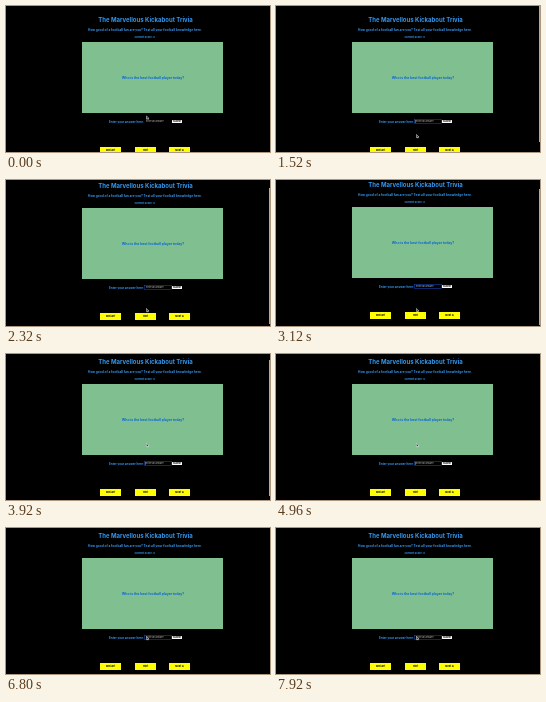
Animation, 264 px wide and 146 px high, one loop 8 s. Source, as an HTML page:

```html
<!DOCTYPE html>
<html lang="en">
<head>
<meta charset="utf-8">
<style>
  html, body { margin: 0; width: 100%; height: 100%; overflow: hidden; background: #000; }
  svg { display: block; width: 100vw; height: 100vh; }
  text { font-family: Inter, Arial, sans-serif; font-weight: 700; text-anchor: middle; fill: #3498f0; }
  .start { text-anchor: start; }
  .plain { font-weight: 400; }
</style>
</head>
<body>
<svg viewBox="0 0 264 146">
  <g id="page">
    <text x="139.5" y="16" font-size="6">The Marvellous Kickabout Trivia</text>
    <text x="139" y="24.9" font-size="3.2">How good of a football fan are you? Test all your football knowledge here.</text>
    <text x="138.7" y="32.1" font-size="2.55">Current Score: 0</text>
    <rect x="76" y="36" width="141" height="71" fill="#80bf8f"/>
    <text x="147" y="72.7" font-size="3.4" style="fill:#0c66d8">Who is the best football player today?</text>
    <text class="start" x="103" y="116.7" font-size="3">Enter your answer here:</text>
    <rect id="field" x="138.5" y="113.5" width="27" height="4" fill="#000" stroke="#1450d0" stroke-width=".5"/>
    <text class="start plain" x="140" y="116.4" font-size="2.3" style="fill:#ccc">Enter an answer</text>
    <rect id="caret" x="139.3" y="114" width=".4" height="2.8" fill="#fff"/>
    <rect x="166" y="114" width="10" height="3" rx=".5" fill="#fff"/>
    <text x="171" y="116.4" font-size="2.3" style="fill:#000">Submit</text>
    <g id="buttons"></g>
  </g>
  <rect id="bar" x="263" width="1" height="136" fill="#aaa"/>
  <path id="cursor" d="M0 0V3.2L.8 2.5 1.3 3.6 1.8 3.4 1.3 2.3H2.4Z" fill="#000" stroke="#fff" stroke-width=".5"/>
</svg>
<script>
const $ = id => document.getElementById(id);

$("buttons").innerHTML = [["Restart", 94], ["Hint", 129], ["Next Q", 163]].map(([label, x]) =>
  `<rect x="${x}" y="141" width="21" height="7" fill="#ff0"/>
   <text x="${x + 10.5}" y="145.4" font-size="2.6" style="fill:#000">${label}</text>`).join("");

// Keys are [time, value] pairs, eased between neighbours.
function track(keys, t) {
  const i = keys.findIndex(k => k[0] > t);
  if (i < 0) return keys[keys.length - 1][1];
  if (i === 0) return keys[0][1];
  const [t0, a] = keys[i - 1], [t1, b] = keys[i];
  const p = (t - t0) / (t1 - t0);
  return a + (b - a) * p * p * (3 - 2 * p);
}

const scrollKeys = [[1520, 0], [1840, 8], [2560, 8], [3120, 9], [3360, 6]];
const cursorKeys = [[1040, 110], [1360, 128.5], [3600, 128.5], [3920, 89.5], [5520, 89.5], [5840, 108.5]];

function draw(now) {
  const t = Math.floor(now % 8000 / 80) * 80;
  const scroll = Math.round(track(scrollKeys, t));
  const focused = t >= 80;
  $("page").setAttribute("transform", `translate(0 ${-scroll})`);
  $("field").setAttribute("stroke-opacity", focused ? 1 : 0);
  $("caret").setAttribute("opacity", focused && t % 1200 < 600 ? 1 : 0);
  $("bar").setAttribute("y", scroll);
  $("bar").setAttribute("opacity", t >= 1520 && t < 4800 ? 1 : 0);
  $("cursor").setAttribute("transform", `translate(140.5 ${track(cursorKeys, t)})`);
  requestAnimationFrame(draw);
}
requestAnimationFrame(draw);
</script>
</body>
</html>
```
